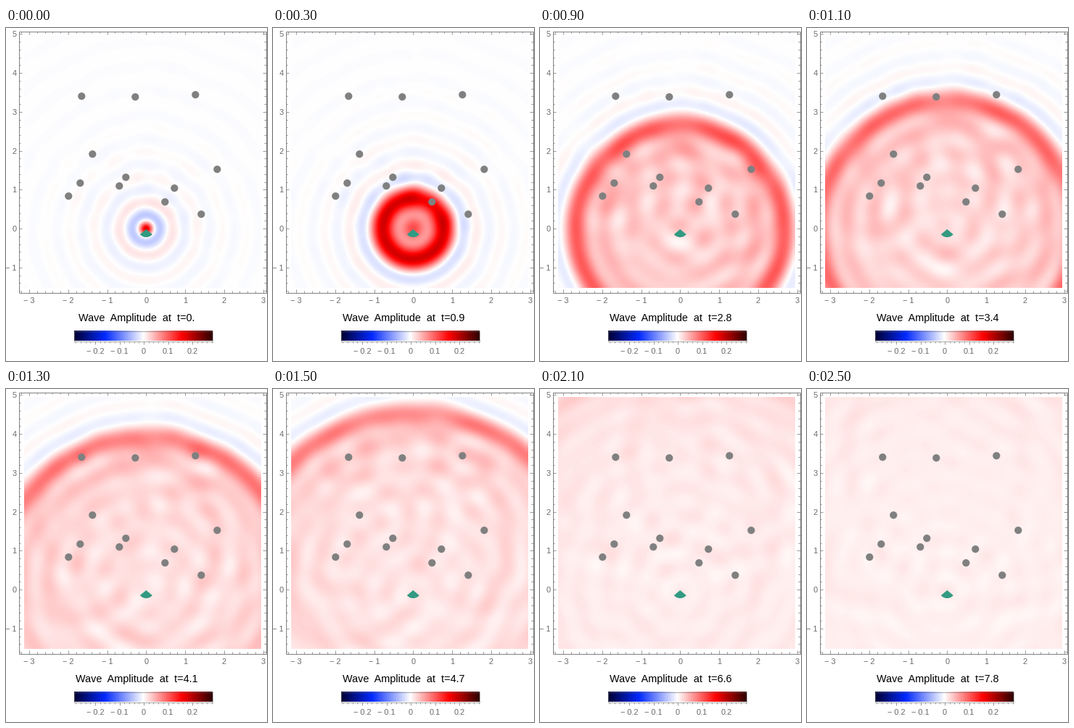
Write a matplotlib script that moves like this. It is 360 px wide and 460 px high and loops after 2.6 s.

```python
import numpy as np
import matplotlib.pyplot as plt
from matplotlib.animation import FuncAnimation
from matplotlib.colors import LinearSegmentedColormap
from matplotlib.patches import Circle, Rectangle, Wedge

W, H, DPI = 360, 460, 80
FRAMES, INTERVAL, TIME_STEP = 26, 100, 0.3125
UNIT, X0, Y0 = 53.75, 193.3, 277.2      # pixels per unit, origin in pixels
LEFT, RIGHT, TOP, BOTTOM, CELL = 25, 352, 11, 359, 3
K_MAX, K_COUNT, STRENGTH, CORE = 10.0, 100, 0.035, 0.12
LIMIT = 0.285
GRAY = "#6a6a6a"

DOTS = np.array([
    (104, 94), (178, 95), (261, 92), (119, 174), (102, 214), (86, 232),
    (165, 206), (156, 218), (232, 221), (219, 240), (269, 257), (291, 195),
])


def hankel_table(x):
    """Hankel function H0 of the first kind along its steepest descent path."""
    dv = 0.02
    v2 = ((np.arange(300) + 0.5) * dv) ** 2
    weight = 2 * np.exp(-v2) * dv
    total = (weight / np.sqrt(2 + 1j * v2 / x[:, None])).sum(axis=1)
    return 2 / (1j * np.pi) * np.exp(1j * (x + np.pi / 4)) * total / np.sqrt(x)


TABLE_X = np.arange(1, 9001) * 0.01
TABLE_H = hankel_table(TABLE_X)


def hankel(x):
    return np.interp(x, TABLE_X, TABLE_H)


def wave_frames():
    """Band-limited pulse from the origin, scattered by all the dots."""
    px, py = np.meshgrid(np.arange(LEFT + CELL / 2, RIGHT, CELL),
                         np.arange(TOP + CELL / 2, BOTTOM, CELL))
    points = ((px - X0) + 1j * (Y0 - py)).ravel() / UNIT
    dots = ((DOTS[:, 0] - X0) + 1j * (Y0 - DOTS[:, 1])) / UNIT
    centers = np.concatenate([[0], dots])
    reach = np.sqrt(np.abs(points - centers[:, None]) ** 2 + CORE ** 2)
    between = np.abs(dots[:, None] - dots)
    identity = np.eye(len(dots))

    dk = K_MAX / K_COUNT
    wavenumbers = (np.arange(K_COUNT) + 0.5) * dk
    modes = np.empty((K_COUNT, points.size), complex)
    for n, k in enumerate(wavenumbers):
        coupling = 0.25j * hankel(k * between) * (1 - identity)
        inverse_t = 1 / (STRENGTH * k * k) - 0.25j
        charge = np.linalg.solve(inverse_t * identity - coupling,
                                 hankel(k * np.abs(dots)))
        amplitude = np.concatenate([[1], 0.25j * charge])
        modes[n] = 0.25j * (amplitude @ hankel(k * reach))

    times = np.arange(FRAMES) * TIME_STEP
    phases = np.exp(-1j * np.outer(times, wavenumbers))
    field = (phases @ modes).real * dk / (2 * np.pi)
    return field.reshape(FRAMES, *px.shape)


def line(x1, y1, x2, y2):
    ax.plot([x1, x2], [y1, y2], color=GRAY, lw=0.6, solid_capstyle="butt")


def label(x, y, text, size=11, color=GRAY, ha="center", va="center_baseline"):
    return ax.text(x, y, text, fontsize=size * 72 / DPI, color=color,
                   ha=ha, va=va, family="Liberation Sans")


def signed(value):
    return str(value) if value >= 0 else f"\u2212 {-value}"


def draw_frame_axes():
    x1, x2, y1, y2 = 17.5, 358.5, 4.5, 365.5
    ax.add_patch(Rectangle((x1, y1), x2 - x1, y2 - y1, fill=False,
                           ec=GRAY, lw=0.75))
    for n in range(-16, 27):
        size = 2.5 if n % 5 else 4.5
        x, y = X0 + n * UNIT / 5, Y0 - n * UNIT / 5
        if x1 < x < x2:
            line(x, y1, x, y1 + size)
            line(x, y2, x, y2 - size)
            if n % 5 == 0:
                label(x, 376, signed(n // 5))
        if y1 < y < y2:
            line(x1, y, x1 + size, y)
            line(x2, y, x2 - size, y)
            if n % 5 == 0:
                label(14.5, y, signed(n // 5), ha="right")


def draw_color_bar():
    x1, x2, y1, y2 = 94, 285, 418.5, 432.5
    ax.imshow(np.linspace(-LIMIT, LIMIT, 400)[None], cmap=colors,
              extent=(x1, x2, y2, y1), aspect="auto", zorder=1)
    ax.add_patch(Rectangle((x1, y1), x2 - x1, y2 - y1, fill=False,
                           ec=GRAY, lw=0.5))
    middle = (x1 + x2) / 2 + 0.5
    for n in range(-14, 15):
        x = middle + n * 6.7
        line(x, y2, x, y2 + (2.5 if n % 5 else 4.5))
        if n % 5 == 0:
            label(x, 446, signed(n / 50) if n else "0")


def time_text(frame):
    tenths = np.round(frame * TIME_STEP * 10) / 10
    return f"Wave  Amplitude  at  t={tenths:.1f}".removesuffix("0")


colors = LinearSegmentedColormap.from_list("wave", [
    (0, "#000032"), (0.22, "#0028ff"), (0.5, "#ffffff"),
    (0.78, "#ff0000"), (1, "#2d0000")], N=512)

fig = plt.figure(figsize=(W / DPI, H / DPI), dpi=DPI, facecolor="white")
ax = fig.add_axes([0, 0, 1, 1])

waves = wave_frames()
image = ax.imshow(waves[0], cmap=colors, vmin=-LIMIT, vmax=LIMIT,
                  extent=(LEFT, RIGHT, BOTTOM, TOP), aspect="auto",
                  interpolation="bicubic", zorder=0)
draw_frame_axes()
draw_color_bar()
for x, y in DOTS:
    ax.add_patch(Circle((x + 0.3, y + 0.2), 5.1, color="#808080", lw=0,
                        zorder=3))
ax.add_patch(Wedge((X0, 278), 11, 40, 140, color="#329a82", lw=0, zorder=3))
title = label(180, 405, time_text(0), 14.4, "black", va="baseline")
ax.set(xlim=(0, W), ylim=(H, 0))
ax.axis("off")


def update(frame):
    image.set_data(waves[frame])
    title.set_text(time_text(frame))
    return image, title


animation = FuncAnimation(fig, update, frames=FRAMES, interval=INTERVAL,
                          repeat=True, repeat_delay=0)
plt.show()
```
